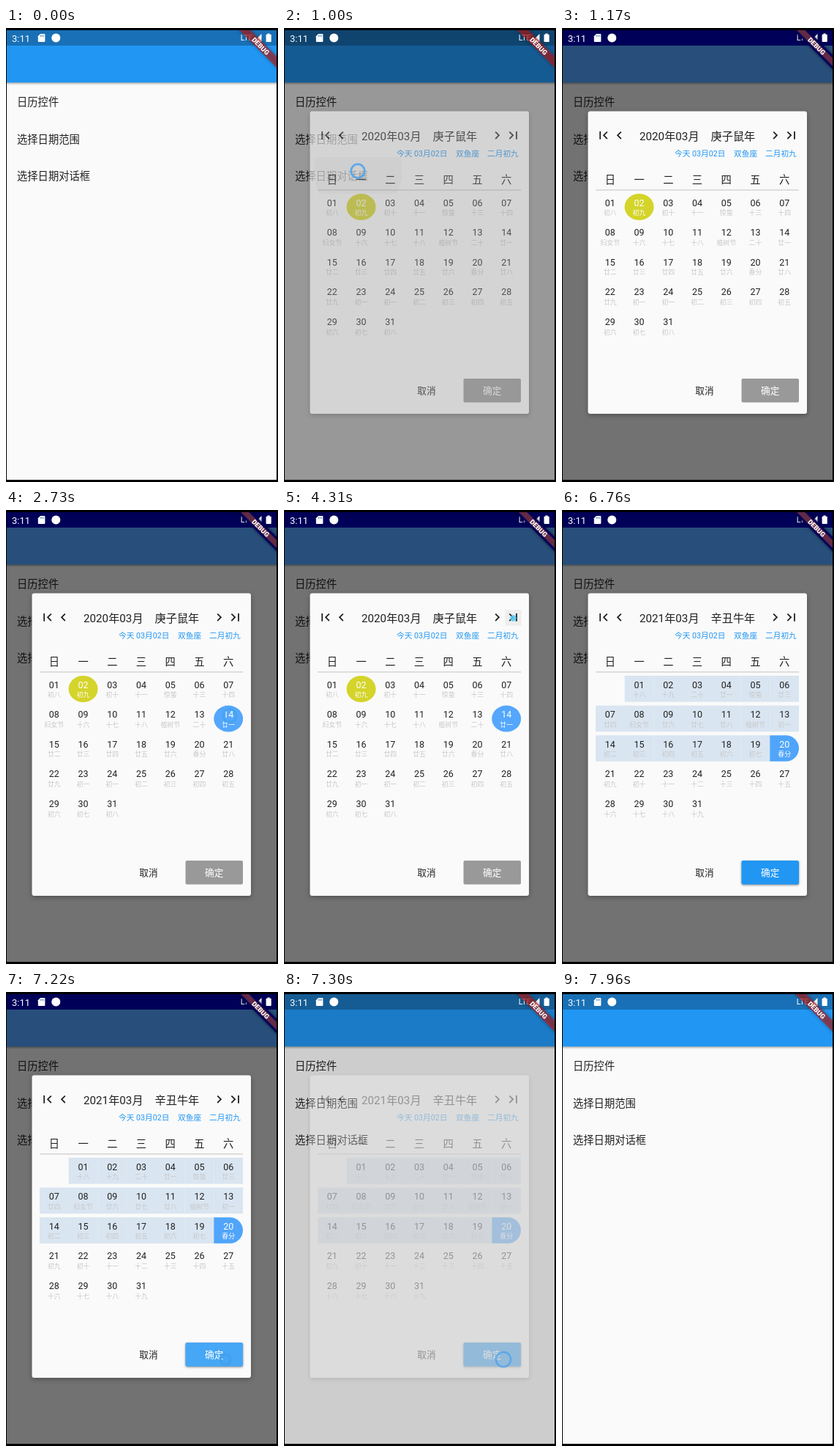
Animation of 372 by 619 pixels, one loop 9.04 s. Source, as an HTML page:

```html
<!DOCTYPE html>
<html lang="zh-CN">
<head>
<meta charset="utf-8">
<title>日历控件</title>
<style>
  html, body { margin: 0; width: 100%; height: 100%; overflow: hidden; background: #000; }
  svg { display: block; width: 372px; height: 619px; }
  text { font-family: Roboto, "Noto Sans CJK SC", "Noto Sans CJK", sans-serif; fill: #212121; white-space: pre; }
  .lunar { fill: #c8c8c8; }
  .white, .on text { fill: #fff; }
  .blue { fill: #2196f3; }
  .mark { display: none; }
  .on .mark { display: inline; }
  #dialog { filter: drop-shadow(0 2px 3px rgba(0, 0, 0, .3)); }
  #band { fill: #b71c1c; fill-opacity: .63; }
  .settled #band { fill: #632a45; fill-opacity: 1; stroke: #00005a; stroke-width: 3; }
  #confirm { fill: #999; }
  #confirm.ready { fill: #2196f3; filter: drop-shadow(0 1px 1.5px rgba(0, 0, 0, .45)); }
</style>
</head>
<body>
<svg id="stage" viewBox="0 0 372 619"></svg>
<script>
const LOOP = 9040;
const CELL = 39.72, LEFT = 46, PITCH = 40.6;

// Moments at which the screen refreshes; it holds still in between.
const beats = [0, 870, 920, 960, 1000, 1040, 1170,
  2600, 2640, 2680, 2720, 2770, 2850, 3320,
  4310, 4350, 4400, 4450, 4500, 4560, 4700,
  5640, 5680, 5720, 5770, 5810, 5850, 5890, 5940,
  ...Array.from({ length: 13 }, (_, i) => 6760 + 40 * i),
  7300, 7340, 7380, 7960];

// Pointer taps: start, end, x, y
const taps = [
  [870, 1170, 101, 195], [2600, 3320, 306, 280.5], [4310, 4700, 313.5, 147.5],
  [5640, 5940, 304, 325], [7140, 7960, 300, 501]
];

const clamp = v => Math.max(0, Math.min(1, v));
const rect = (x, y, w, h, attrs = '') =>
  `<rect x="${x}" y="${y}" width="${w}" height="${h}" ${attrs}/>`;
const text = (x, mid, size, str, attrs = '') =>
  `<text x="${x}" y="${mid + size * .37}" font-size="${size}" ${attrs}>${str}</text>`;
const centered = (x, mid, size, str, cls = '') =>
  text(x, mid, size, str, `text-anchor="middle" class="${cls}"`);

const digits = '一二三四五六七八九十';
const holidays = { 5: '惊蛰', 8: '妇女节', 12: '植树节', 20: '春分' };

function lunarName(n) {
  if (n === 20) return '二十';
  const prefix = n <= 10 ? '初' : n < 20 ? '十' : '廿';
  return prefix + digits[(n - 1) % 10];
}

// firstCol: weekday of the 1st; lunarDay: day number to lunar day
function month(firstCol, lunarDay, marks) {
  let out = '';
  for (let d = 1; d <= 31; d++) {
    const slot = d - 1 + firstCol;
    const x = LEFT + CELL * (slot % 7 + .5);
    const top = 226 + PITCH * Math.floor(slot / 7);
    out += `<g class="day" data-day="${d}">${marks(d, x, top)}` +
      centered(x, top + 12, 12.5, String(d).padStart(2, '0')) +
      centered(x, top + 26, 8.9, holidays[d] || lunarName(lunarDay(d)), 'lunar') + '</g>';
  }
  return out;
}

const oval = (x, top, color) =>
  `<ellipse class="mark" cx="${x}" cy="${top + 18}" rx="20" ry="18" fill="${color}"/>`;

function marks2020(d, x, top) {
  return d === 2 ? oval(x, top, '#d4d42a') : d === 14 ? oval(x, top, '#54a7fc') : '';
}

function marks2021(d, x, top) {
  const l = x - CELL / 2;
  if (d < 20) return rect(l, top, CELL + .1, 35.6, 'class="range" fill="#d9e5f1"');
  if (d > 20) return '';
  return `<path class="mark" fill="#50a5fa" d="M${l} ${top}h${CELL - 17.8}a17.8 17.8 0 0 1 0 35.6h${17.8 - CELL}z"/>`;
}

const chevron = 'M15.41 7.41L14 6l-6 6 6 6 1.41-1.41L10.83 12z';
const first = 'M18.41 16.59L13.82 12l4.59-4.59L17 6l-6 6 6 6zM6 6h2v12H6z';
const icon = (x, path, flip = 1) =>
  `<path d="${path}" fill="#212121" transform="translate(${x} 146.3) scale(${.9 * flip} .9) translate(-12 -12)"/>`;

const title = (id, ym, year) => `<g id="${id}">` +
  text(106, 147.5, 15.2, ym) + text(203.5, 147.5, 15.2, year) + '</g>';

const stage = document.getElementById('stage');
stage.innerHTML = `
<defs>
  <clipPath id="screen">${rect(1, 3, 369, 613)}</clipPath>
  <clipPath id="tile">${rect(1, 176, 369, 50)}</clipPath>
  <clipPath id="page">${rect(LEFT, 222, 278.2, 205)}</clipPath>
  <clipPath id="button">${rect(245.5, 478, 78.5, 32.5, 'rx="2"')}</clipPath>
  <linearGradient id="fade" x2="0" y2="1">
    <stop stop-color="#000" stop-opacity=".32"/><stop offset="1" stop-color="#000" stop-opacity="0"/>
  </linearGradient>
</defs>
${rect(0, 0, 372, 619)}
<g clip-path="url(#screen)">
  ${rect(1, 3, 369, 613, 'fill="#fafafa"')}
  ${rect(1, 74, 369, 4, 'fill="url(#fade)"')}
  ${rect(1, 24, 369, 50.3, 'fill="#2196f3"')}
  ${rect(1, 3, 369, 21, 'fill="#1970b6"')}
  ${['日历控件', '选择日期范围', '选择日期对话框'].map((s, i) => text(15, 101 + 50.3 * i, 14.3, s)).join('')}
  <circle id="ink" cx="101" cy="195" clip-path="url(#tile)" fill-opacity=".08"/>
  ${rect(1, 3, 369, 613, 'id="barrier"')}
  <g id="tint">
    ${rect(1, 3, 369, 21, 'fill="#000058"')}
    ${rect(1, 24, 369, 50.3, 'fill="#284f7b"')}
  </g>
  <g id="dialog">
    ${rect(35.5, 113.5, 299.5, 412.5, 'rx="3" fill="#fafafa"')}
    ${rect(302.5, 136, 22, 21.5, 'id="hover" fill="#eee"')}
    ${icon(56.7, first)}${icon(78.4, chevron)}${icon(291.6, chevron, -1)}${icon(313.5, first, -1)}
    ${title('title2020', '2020年03月', '庚子鼠年')}
    ${title('title2021', '2021年03月', '辛丑牛年')}
    ${text(154, 171.5, 10.7, '今天 03月02日', 'class="blue"')}
    ${text(235, 171.5, 10.7, '双鱼座', 'class="blue"')}
    ${text(278, 171.5, 10.7, '二月初九', 'class="blue"')}
    ${[...'日一二三四五六'].map((s, i) => centered(LEFT + CELL * (i + .5), 206.5, 14.3, s)).join('')}
    ${rect(LEFT, 220.2, 278, 1.4, 'fill="#d2d2d2"')}
    <g clip-path="url(#page)">
      <g id="page2020">${month(0, d => d < 23 ? d + 7 : Math.max(1, d - 23), marks2020)}</g>
      <g id="page2021">${month(1, d => d < 13 ? d + 17 : d - 12, marks2021)}</g>
    </g>
    ${centered(195, 494.7, 12.7, '取消')}
    ${rect(245.5, 478, 78.5, 32.5, 'rx="2" id="confirm"')}
    <g clip-path="url(#button)"><circle id="press" cx="300" cy="501" fill="#fff" fill-opacity=".16"/></g>
    ${centered(284.8, 494.7, 12.7, '确定', 'white')}
  </g>
  <g fill="#fff">
    ${text(8, 13.8, 13, '3:11', 'class="white"')}
    <path d="M47 8h5.4q1 0 1 1v9q0 1-1 1h-7.6q-1 0-1-1v-6.800z"/>
    <path d="M47.300 9.600v2.200M49.300 9.600v2.200M51.300 9.600v2.200" stroke="#1970b6" stroke-width=".9"/>
    <circle cx="68.300" cy="13.500" r="6"/>
    ${text(320.8, 13.3, 10.8, 'LTE', 'class="white"')}
    <path d="M349.500 8v11h-11z"/>
    <path d="M357.500 7.500h3.200v1.300h1.300q.8 0 .8.8v8.700q0 .8-.8.8h-5.600q-.8 0-.8-.8v-8.700q0-.8.8-.8h1.100z"/>
  </g>
  <g transform="translate(370 3) rotate(45)">
    <g style="filter:drop-shadow(0 0 2.500px rgba(0,0,0,.5))">${rect(-40, 25.2, 80, 10.8, 'id="band"')}</g>
    ${text(0, 30.6, 9.2, 'DEBUG', 'text-anchor="middle" class="white" font-weight="900"')}
  </g>
  <circle id="ring" fill="none" stroke="#45a0ee"/>
</g>`;

const $ = id => document.getElementById(id);
const day = (page, d) => $(page).querySelector(`[data-day="${d}"]`);
const show = (el, on) => { el.style.display = on ? '' : 'none'; };
const set = (el, attrs) => { for (const k in attrs) el.setAttribute(k, attrs[k]); };

const el = {};
for (const id of ['ink', 'barrier', 'tint', 'dialog', 'hover', 'title2020', 'title2021',
  'page2020', 'page2021', 'confirm', 'press', 'ring']) el[id] = $(id);
const startDay = day('page2020', 14), endDay = day('page2021', 20);
const ranges = [...document.querySelectorAll('.range')];
day('page2020', 2).classList.add('on');

function drawRing(t) {
  const tap = taps.find(([a, b]) => t >= a && t < b);
  show(el.ring, tap);
  if (!tap) return;
  const [start, , x, y] = tap;
  const p = clamp((t - start) / 220);
  set(el.ring, {
    cx: x, cy: y, r: 2 + 9.5 * Math.sqrt(p), 'stroke-width': 4.5 - 3 * p,
    stroke: p ? '#45a0ee' : '#58c8f0', opacity: .9 - .4 * p * p * p
  });
}

function draw(now) {
  const time = now % LOOP;
  const t = beats.findLast(b => b <= time);
  const closing = clamp((7350 - t) / 150);
  const shade = Math.min(clamp((t - 895) / 145), closing);
  const opacity = Math.min(clamp((t - 908) / 150), closing);
  const settled = t >= 1170 && t < 7240;

  set(el.barrier, { opacity: .54 * shade });
  set(el.dialog, { opacity });
  show(el.dialog, opacity > 0);
  show(el.tint, settled);
  stage.classList.toggle('settled', settled);

  show(el.ink, t >= 870 && t < 1170);
  set(el.ink, { r: 15 + .35 * Math.max(0, t - 870) });

  const slide = 1 - (1 - clamp((t - 4360) / 200)) ** 2;
  set(el.page2020, { transform: `translate(${-278 * slide} 0)` });
  set(el.page2021, { transform: `translate(${278 * (1 - slide)} 0)` });
  show(el.page2020, slide < 1);
  show(el.page2021, slide > 0);
  show(el.title2020, slide < .5);
  show(el.title2021, slide >= .5);
  show(el.hover, t >= 4310 && t < 4700);

  const ended = t >= 5720;
  startDay.classList.toggle('on', t >= 2640);
  endDay.classList.toggle('on', ended);
  ranges.forEach(r => show(r, ended));
  el.confirm.classList.toggle('ready', ended);

  show(el.press, t >= 6800 && t < 7240);
  set(el.press, { r: 6 + .15 * Math.max(0, t - 6800) });
  drawRing(t);
}

function frame() {
  draw(performance.now());
  requestAnimationFrame(frame);
}
frame();
</script>
</body>
</html>
```
